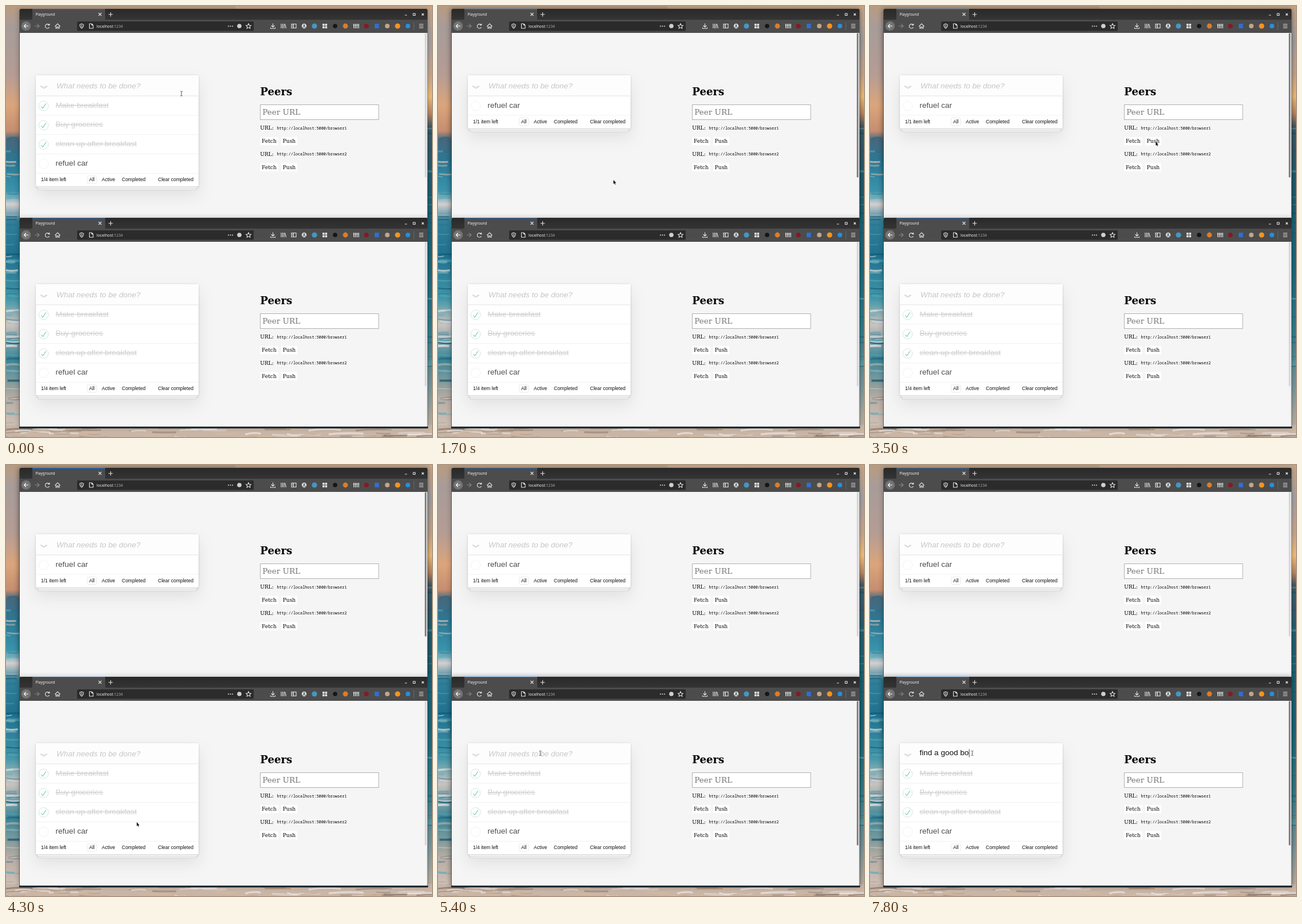
Recreate the animation shown at these times as an HTML page. Size 743 by 753 pixels, loop 8000 ms.

```html
<!DOCTYPE html>
<html lang="en">
<head>
<meta charset="utf-8">
<title>Playground</title>
<style>
html, body { margin: 0; width: 100%; height: 100%; overflow: hidden; background: #8d9499; }
svg { display: block; width: 743px; height: 753px; }
text { white-space: pre; }
.ui { font-family: "Noto Sans", sans-serif; fill: #f2f2f2; }
.sans { font-family: "Liberation Sans", Arial, sans-serif; }
.serif { font-family: "DejaVu Serif", serif; font-size: 9.04px; }
.mono { font-family: "Noto Sans Mono", monospace; font-size: 6.78px; }
.todo { font-size: 13.55px; fill: #4d4d4d; }
.done { fill: #d0d0d0; text-decoration: line-through; }
.hint { font-size: 13.45px; font-style: italic; fill: #c6c6c6; }
.foot { font-size: 8.5px; fill: #111; }
.icon { fill: none; stroke: #e4e4e4; stroke-width: 1.1; }
.card { fill: #fff; filter: drop-shadow(0 1px 2px rgba(0,0,0,.18)) drop-shadow(0 14px 14px rgba(0,0,0,.09)); }
.shade { filter: blur(5px); }
</style>
</head>
<body>
<svg id="stage" viewBox="0 0 743 753" xmlns="http://www.w3.org/2000/svg"></svg>
<script>
const LOOP = 8000, STEP = 100, ROW = 33.75, LIST_TOP = 157.4, WINDOW_GAP = 365;
const stage = document.getElementById('stage');
const $ = id => document.getElementById(id);

let seed = 7;
const rand = () => (seed = seed * 16807 % 2147483647) / 2147483647;

const rect = (x, y, w, h, fill, extra = '') =>
  `<rect x="${x}" y="${y}" width="${w}" height="${h}" fill="${fill}" ${extra}/>`;
const text = (x, y, cls, body, extra = '') => `<text x="${x}" y="${y}" class="${cls}" ${extra}>${body}</text>`;
const icon = (d, extra = '') => `<path class="icon" d="${d}" ${extra}/>`;
const dot = (x, y, r, fill) => `<circle cx="${x}" cy="${y}" r="${r}" fill="${fill}"/>`;
const gradient = (id, stops) => `<linearGradient id="${id}" x2="0" y2="1">` +
  stops.map(([at, color]) => `<stop offset="${at}" stop-color="${color}"/>`).join('') + '</linearGradient>';

function wave(x, y, w, color) {
  const bend = (rand() - .5) * 9;
  return `<path d="M${x} ${y}q${w / 2} ${bend} ${w} ${bend / 3}" fill="none" stroke="${color}" ` +
    `stroke-width="${1 + rand() * 3}" opacity="${.25 + rand() * .45}"/>`;
}

function seaside() {
  const pick = colors => colors[Math.floor(rand() * colors.length)];
  const sea = ['#e5e2df', '#1c6a88', '#0e5470', '#58a9b8', '#d9c3b4'];
  const foam = ['#f1ebe8', '#a98970', '#7d6c66', '#d7b99c', '#ffffff'];
  let out = rect(0, 0, 400, 753, 'url(#leftSky)') + rect(400, 0, 343, 753, 'url(#rightSky)') +
    rect(0, 732, 743, 21, '#c9b5a6');
  for (let i = 0; i < 60; i++) out += wave(-8 + rand() * 12, 232 + rand() * 500, 14 + rand() * 22, pick(sea));
  for (let i = 0; i < 26; i++) out += wave(732, 210 + rand() * 480, 14, pick(sea.slice(1, 4)));
  for (let i = 0; i < 75; i++) out += wave(-10 + rand() * 740, 735 + rand() * 20, 18 + rand() * 45, pick(foam));
  return out;
}

function chrome() {
  const left = icon('M39 35H31.5M35 31.5L31.5 35 35 38.5', 'style="stroke:#fff"') +
    icon('M50 35h7.5M54.500 31.5L58 35l-3.500 3.500', 'style="stroke:#858585"') +
    icon('M75.200 33.200A3.700 3.700 0 1 0 75.500 37M75.800 30.800V33.500H73') +
    icon('M85.500 35.500L90 31l4.500 4.500M87 35v4h2v-2.500h2V39h2v-4') +
    icon('M132 31.200l3.200 1.100c0 3.500-.8 5.300-3.200 6.700-2.400-1.400-3.200-3.200-3.200-6.700zM132 33v4') +
    icon('M145.500 31h4l2.500 2.500V39h-6.500zM149.500 31v2.500h2.500');
  const right = [388, 391.5, 395].map(x => dot(x, 35.3, 1, '#ddd')).join('') +
    dot(407, 35, 3.8, '#d0d0d0') +
    icon('M423 30.800l1.300 2.900 3.100.3-2.300 2.100.7 3.100-2.800-1.600-2.800 1.600.7-3.100-2.300-2.100 3.100-.3z') +
    icon('M465.500 30.500v6M462.500 34l3 3 3-3M461.500 37.500v1.700h8v-1.700') +
    icon('M480 31v8M482.500 31v8M485 31v8M486.500 31.500l2 7.500') +
    icon('M498 31.500h8v7h-8zM501.500 31.500v7M499 33.500h1.500M499 35.500h1.500') +
    dot(520, 35, 4.2, '#dedede') + dot(520, 33.8, 1.4, '#4b4b4b') + icon('M517.500 37.500q2.500-2.500 5 0', 'style="stroke:#4b4b4b"') +
    dot(538, 35, 4.6, '#4596c4') +
    [[552, 31], [556.5, 31], [552, 35.5], [556.5, 35.5]].map(([x, y]) => rect(x, y, 3.6, 3.6, '#e0e0e0')).join('') +
    dot(574, 35, 3.8, '#161616') + dot(592, 35, 4.4, '#dd7d28') +
    [606, 608.8, 611.6, 614.4].map(x => rect(x, 31, 1.3, 8, '#e2e2e2')).join('') +
    icon('M605 33.500h11', 'stroke-opacity=".6"') +
    dot(628.5, 35, 4, '#8a1820') + rect(643, 31, 7.5, 8, '#2c70d0') +
    dot(665, 35, 4, '#c5a487') + dot(683, 35, 4.6, '#f5941f') + dot(701, 35, 4, '#2490d8') +
    rect(711, 28, .7, 14, '#707070') +
    icon('M720.500 32h7.500M720.500 35h7.500M720.500 38h7.500');
  const controls = icon('M161.500 12l5 5M166.500 12l-5 5M182.500 11v7.500M178.700 14.700h7.500') +
    icon('M695.700 16h3.600M710.200 13h3.500v3.500h-3.500zM725.200 13l3.500 3.500M728.700 13l-3.500 3.500');
  return rect(24, 5, 711, 30, 'url(#strip)', 'rx="2"') + rect(46, 5, 127, 20, '#4c4c4d') +
    rect(24, 24, 711, 23, '#4c4c4d') + rect(124, 27, 308, 16.5, '#2b2b2c', 'rx="1.5"') +
    dot(35, 35, 8.3, '#737374') + left + right + controls +
    text(51.5, 17, 'ui', 'Playground', 'font-size="6.25"') +
    text(158, 37.5, 'ui', 'localhost<tspan fill="#a5a5a5">:1234</tspan>', 'font-size="6.78"');
}

function todoRow(label, done, index) {
  const y = LIST_TOP + index * ROW;
  const tick = done ? '<path fill="#5dc2af" d="M72 25L42 71 27 56l-4 4 20 20 34-52z"/>' : '';
  return `<g transform="translate(57.200 ${y + 8.7}) scale(.167)">` +
    `<circle cx="50" cy="50" r="50" fill="none" stroke="${done ? '#bddad5' : '#ededed'}" stroke-width="4"/>${tick}</g>` +
    text(86.5, y + 20.3, 'sans todo' + (done ? ' done' : ''), label) +
    rect(52.5, y + ROW - .5, 283, .6, '#e8e8e8');
}

function todoCard(id, tasks) {
  const footY = LIST_TOP + tasks.length * ROW, bottom = footY + 23.2;
  const left = tasks.filter(task => !task[1]).length;
  const layer = (inset, drop) =>
    rect(52.5 + inset, bottom - 8, 283 - 2 * inset, 8 + drop, '#f6f6f6', 'stroke="#c9c9c9" stroke-width=".7"');
  return `<g id="${id}">` +
    `<rect class="card" x="52.500" y="121" width="283" height="${bottom - 121}"/>` +
    layer(3.4, 5.6) + layer(1.7, 2.8) +
    rect(52.5, 121, 283, bottom - 121, '#fff') + rect(52.5, bottom - .3, 283, .8, '#c8c8c8') +
    rect(52.5, 121, 283, 36, '#fdfdfd') + rect(52.5, 156.6, 283, .9, '#dfdfdf') +
    '<path d="M60.300 139.700L66 143.300l5.700-3.600" fill="none" stroke="#dcdcdc" stroke-width="2.400"/>' +
    tasks.map((task, i) => todoRow(...task, i)).join('') +
    rect(141.5, footY + 4.5, 16.7, 13, 'none', 'rx="1.500" stroke="#e6e6e6" stroke-width=".8"') +
    [[61, `${left}/${tasks.length} item left`], [145, 'All'], [167, 'Active'], [202, 'Completed'], [265, 'Clear completed']]
      .map(([x, label]) => text(x, footY + 13.6, 'sans foot', label)).join('') + '</g>';
}

function peers() {
  const button = (x, y, w, label) => rect(x, y, w, 14.4, '#fff') + text(x + 2.8, y + 10, 'serif', label);
  const peer = (y, n) => text(443.3, y, 'serif', 'URL:') +
    text(472.5, y - .5, 'mono', `http://localhost:5000/browser${n}`) +
    button(443.3, y + 12.7, 31.5, 'Fetch') + button(480, y + 12.7, 28, 'Push');
  return text(443.3, 155.8, 'serif', 'Peers', 'style="font-size:18.1px;font-weight:bold"') +
    rect(443.5, 172.5, 206.5, 26, '#fff', 'stroke="#b0b0b0"') +
    text(447.3, 190, 'serif', 'Peer URL', 'style="font-size:13.55px" fill="#757575"') +
    peer(216.2, 1) + peer(261.8, 2);
}

function browser(n, cards) {
  return `<g transform="translate(0 ${(n - 1) * WINDOW_GAP})">` +
    rect(22, 5, 714, 366, '#000', `class="shade" id="shade${n}"`) +
    rect(23.3, 7, 712, 363, '#3a4145') + rect(24, 47, 711, 323, '#f5f5f5') +
    chrome() + rect(46, 5, 127, 1.2, '#1272d6', `id="tabLine${n}"`) +
    rect(730.5, 47.5, 2.8, 252, '#777', `rx="1.200" id="thumb${n}"`) +
    rect(733.6, 47, 1.4, 323, '#dcdcdc') + cards + peers() +
    text(88, 143.6, 'sans hint', 'What needs to be done?', `id="hint${n}"`) +
    text(86.5, 142, 'sans todo', '', `id="typed${n}" style="fill:#111"`) + '</g>';
}

const tasks = [['Make breakfast', true], ['Buy groceries', true], ['clean up after breakfast', true], ['refuel car', false]];
stage.innerHTML = '<defs>' +
  gradient('strip', [[0, '#292929'], [1, '#3b3b3b']]) +
  gradient('leftSky', [[0, '#b99c80'], [.05, '#a79c9a'], [.16, '#b59d94'], [.23, '#dba57c'], [.29, '#c58e70'], [.31, '#49677b'],
    [.36, '#2b7894'], [.43, '#3a94ac'], [.46, '#d3d0d0'], [.5, '#327f98'], [.58, '#1f7190'], [.68, '#4397a9'],
    [.74, '#c9c3bf'], [.82, '#3a8496'], [.91, '#b9aca2'], [1, '#d7c8bf']]) +
  gradient('rightSky', [[0, '#c8a587'], [.08, '#a4a0a3'], [.16, '#c7a68c'], [.21, '#f0bd79'], [.25, '#b98563'], [.28, '#415763'],
    [.4, '#225c70'], [.6, '#18677b'], [.75, '#317b8a'], [.88, '#78959a'], [1, '#cdb7a4']]) +
  '</defs>' + seaside() +
  browser(1, todoCard('fullList', tasks) + todoCard('shortList', tasks.slice(3))) +
  rect(23, 734.5, 713, 3.5, '#1c2a31') +
  browser(2, todoCard('lowerList', tasks)) +
  rect(23, 734.8, 713, 3.2, '#1c2a31') +
  rect(265, 307.3, 62, .7, '#111', 'id="underline"') +
  rect(0, 496.5, .8, 14, '#111', 'id="caret"') +
  `<g id="pointer" stroke-linejoin="round">
    <path id="arrow" d="M0 0V7L1.600 5.600 2.700 8 3.800 7.500 2.700 5.200H4.800z" fill="#111" stroke="#fff" stroke-width=".5" paint-order="stroke"/>
    <path id="hand" d="M-.7 .5Q0-.3 .7 .5V3L4.300 3.700V6L3.500 8H-.5L-2.700 4.700-1.900 4-.7 5z" fill="#111" stroke="#fff" stroke-width=".5" paint-order="stroke"/>
    <path id="beam" d="M-1.900-4Q-.3-4 0-3.300 .3-4 1.900-4M0-3.300V3.300M-1.900 4Q-.3 4 0 3.300 .3 4 1.900 4" fill="none" stroke="#444" stroke-width=".9"/>
  </g>`;

// Pointer stops: time, x, y
const path = [[0, 306, 153], [200, 306, 153], [550, 326, 225], [900, 306, 303.5], [2000, 306, 304], [2500, 474, 236.5],
  [3400, 474, 236.5], [3500, 498.3, 237], [3800, 498.3, 237], [4300, 228, 624], [4400, 228, 624],
  [4500, 235, 646], [4800, 190.5, 616.5], [4900, 190.5, 616.5], [5200, 178.3, 503.5], [LOOP, 178.3, 503.5]];
const typing = [[6600, 1], [6700, 3], [6800, 4], [6900, 6], [7100, 7], [7200, 8], [7300, 9], [7400, 10], [7500, 11], [7700, 13], [7800, 14]];
const phrase = 'find a good bo';

function pointerAt(t) {
  const i = path.findIndex(stop => stop[0] > t);
  const [t0, x0, y0] = path[i - 1], [t1, x1, y1] = path[i];
  const u = (t - t0) / (t1 - t0), k = u * u * (3 - 2 * u);
  return [x0 + (x1 - x0) * k, y0 + (y1 - y0) * k];
}

const show = (id, on) => $(id).setAttribute('display', on ? 'inline' : 'none');
const fade = (id, value) => $(id).setAttribute('opacity', value);

function render(time) {
  const t = Math.floor(time / STEP) * STEP;
  const cleared = t >= 1700;
  const focus = t < 1600 ? 0 : t < 5400 ? 1 : 2;
  show('fullList', !cleared);
  show('shortList', cleared);
  for (const n of [1, 2]) {
    fade('shade' + n, focus === n ? .4 : .22);
    fade('tabLine' + n, focus === n ? 1 : .55);
    fade('thumb' + n, focus === n ? 1 : .25);
  }

  const [x, y] = pointerAt(t);
  const localY = y > 370 ? y - WINDOW_GAP : y;
  const inField = x > 52 && x < 336 && localY > 121 && localY < 157;
  const onClear = !cleared && y > 298;
  $('pointer').setAttribute('transform', `translate(${x} ${y})`);
  show('beam', inField);
  show('hand', onClear);
  show('arrow', !inField && !onClear);
  show('underline', onClear);

  const count = typing.reduce((n, [at, length]) => t >= at ? length : n, 0);
  $('typed2').textContent = phrase.slice(0, count);
  show('hint2', !count);
  show('caret', count > 1);
  if (count) $('caret').setAttribute('x', 86.8 + $('typed2').getComputedTextLength());
}

let start;
function tick(now) {
  start ??= now;
  render((now - start) % LOOP);
  requestAnimationFrame(tick);
}
render(0);
requestAnimationFrame(tick);
</script>
</body>
</html>
```
